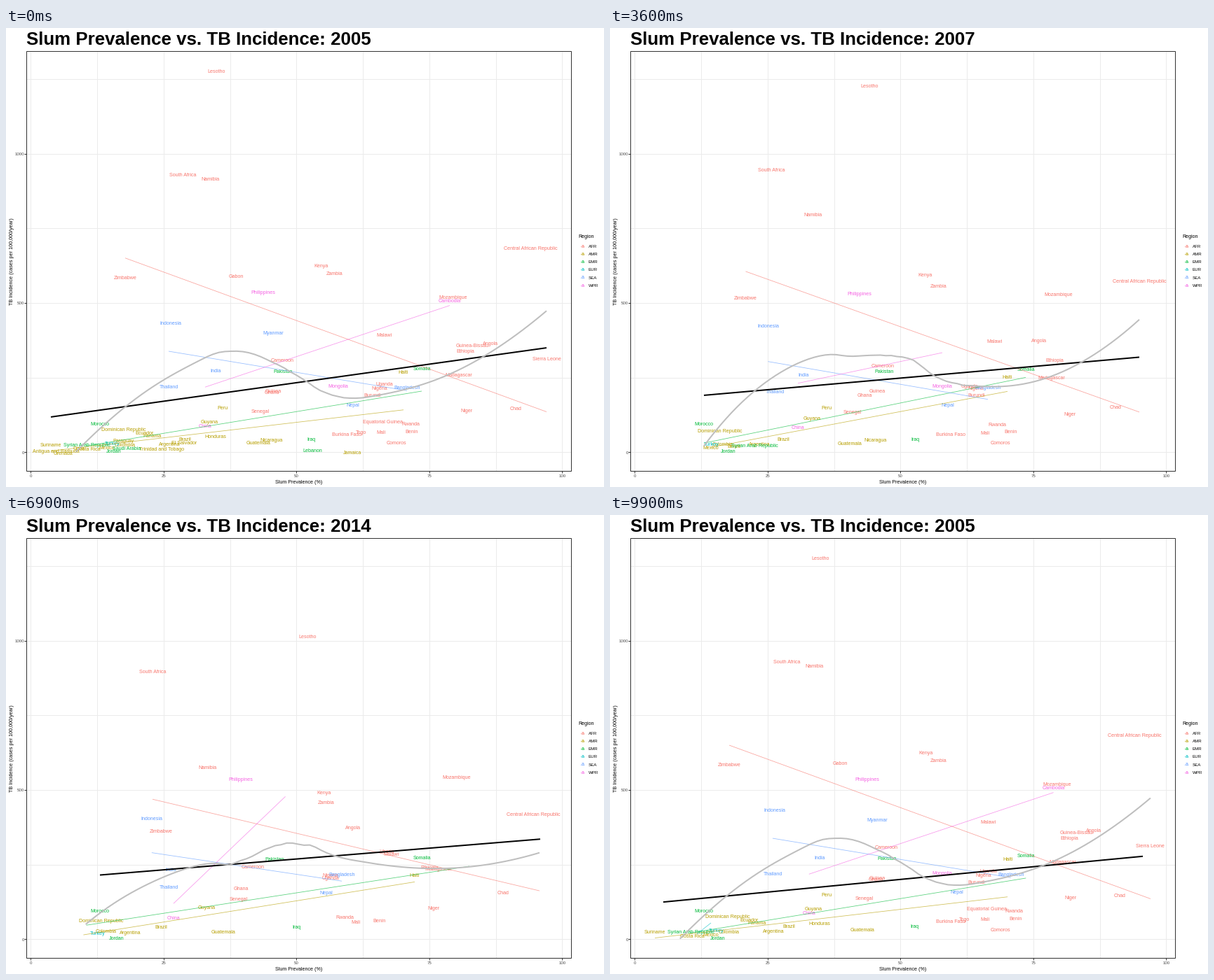
Recreate the animation shown at these times as a matplotlib script. Size 853 by 656 pixels, loop 10000 ms.

```python
import numpy as np
import matplotlib.pyplot as plt
from matplotlib.animation import FuncAnimation
from matplotlib.patches import Rectangle

W, H, DPI = 853, 656, 64
PX = 72 / DPI                     # points per pixel
HOLD, MOVE = 13, 12               # frames at rest and in transition
STEP = HOLD + MOVE
YEARS = (2005, 2007, 2009, 2014)
COLORS = dict(AFR="#F8766D", AMR="#B79F00", EMR="#00BA38",
              EUR="#00BFC4", SEA="#619CFF", WPR="#F564E3")
LEFT, TOP, RIGHT, BOTTOM = 29.5, 32.5, 806, 633

plt.rcParams["font.family"] = "Liberation Sans"
fig = plt.figure(figsize=(W / DPI, H / DPI), dpi=DPI, facecolor="white")
ax = fig.add_axes([0, 0, 1, 1])
ax.set(xlim=(0, W), ylim=(H, 0))
ax.axis("off")


def text(x, y, s, size=7.1, color="black", **kw):
    kw = {"ha": "center", "va": "baseline", **kw}
    return ax.text(x, y, s, fontsize=size * PX, color=color, **kw)


def line(xs, ys, color, width=1.0, **kw):
    return ax.plot(xs, ys, color=color, lw=width * PX,
                   solid_capstyle="butt", **kw)[0]


def x_px(v):
    return 35.3 + 7.58 * v


def y_px(v):
    return 606.3 - 0.4265 * v


def mix(a, b, p):
    return (1 - p) * np.asarray(a) + p * np.asarray(b)


def ease(u):
    return 4 * u ** 3 if u < 0.5 else 1 - 4 * (1 - u) ** 3


# Panel, grid and axes
for v in np.arange(0, 101, 12.5):
    line([x_px(v)] * 2, [TOP, BOTTOM], "#EBEBEB", zorder=0)
for v in range(0, 1251, 250):
    line([LEFT, RIGHT], [y_px(v)] * 2, "#EBEBEB", zorder=0)
ax.add_patch(Rectangle((LEFT, TOP), RIGHT - LEFT, BOTTOM - TOP, fill=False,
                       ec="#333333", lw=PX, zorder=9))
for v in range(0, 101, 25):
    line([x_px(v)] * 2, [BOTTOM, BOTTOM + 3], "#333333")
    text(x_px(v), 642, v, 6.1, "#4D4D4D")
for v in range(0, 1001, 500):
    line([LEFT - 3, LEFT], [y_px(v)] * 2, "#333333")
    text(26.3, y_px(v) + 2.4, v, 6.1, "#4D4D4D", ha="right")
text(417.5, 651, "Slum Prevalence (%)")
text(9.6, 333.5, "TB Incidence (cases per 100,000/year)", 7.2,
     rotation=90, rotation_mode="anchor")
title = text(29, 24, "", 25.9, ha="left", weight="bold")

# Legend
text(816, 300.5, "Region", ha="left")
for i, (name, color) in enumerate(COLORS.items()):
    y = 311.5 + 11.25 * i
    text(822.5, y + 2, "a", 7.1, color)
    line([819.5, 825.5], [y, y], color, 0.8, alpha=0.4)
    text(831, y + 2.2, name, 6.1, ha="left")

ALL, GAP, ENDS = (0, 1, 2, 3), (0, 1, 3), (0, 3)
labels = []


def add(region, name, start, end=None, mid=None, years=ALL):
    """Label a country; `mid` bends its path, 2007 lies halfway to it."""
    end = end or start
    if mid is None:
        mid = mix(start, end, 0.55) if years == ALL else start
    path = [start, mix(start, mid, 0.5), mid, end]
    spots = [path[k] if k in years else None for k in range(len(YEARS))]
    art = text(0, 0, name, 7.1, COLORS[region], zorder=3)
    labels.append((region, art, spots))


add("AFR", "Lesotho", (300, 61), (420, 243), (441, 103))
add("AFR", "South Africa", (252, 209), (209, 251), (209, 195))
add("AFR", "Namibia", (291, 215), (286, 402))
add("AFR", "Zimbabwe", (170, 356), (225, 488), (217, 415))
add("AFR", "Kenya", (450, 339), (459, 426), (449, 366))
add("AFR", "Zambia", (469, 350), (444, 434), (469, 387))
add("AFR", "Central African Republic", (748, 314), (742, 447), (762, 408))
add("AFR", "Mozambique", (638, 384), (644, 372))
add("AFR", "Malawi", (539, 438), (541, 511), (558, 457))
add("AFR", "Angola", (691, 450), (456, 450), (533, 443))
add("AFR", "Ethiopia", (655, 461), (596, 519), (613, 487))
add("AFR", "Madagascar", (646, 495), (621, 507), (613, 503))
add("AFR", "Cameroon", (394, 474), (321, 513), (384, 491))
add("AFR", "Uganda", (540, 508), (441, 521))
add("AFR", "Nigeria", (533, 514), (415, 514), (510, 514))
add("AFR", "Ghana", (379, 520), (323, 537))
add("AFR", "Senegal", (363, 547), (334, 548), (329, 549))
add("AFR", "Niger", (657, 546), (566, 565), (654, 557))
add("AFR", "Chad", (727, 543), (704, 539))
add("AFR", "Rwanda", (577, 565), (438, 580), (528, 568))
add("AFR", "Mali", (535, 577), (462, 583), (535, 580))
add("AFR", "Benin", (579, 576), (501, 581), (564, 577))
add("AFR", "Burundi", (523, 524), (474, 553), years=GAP)
add("AFR", "Guinea", (381, 518), (363, 532), years=GAP)
add("AFR", "Burkina Faso", (486, 580), (533, 584), years=GAP)
add("AFR", "Comoros", (557, 592), (562, 592), years=GAP)
add("AFR", "Gabon", (328, 354), (315, 417), years=ENDS)
add("AFR", "Guinea-Bissau", (665, 453), (659, 449), years=ENDS)
add("AFR", "Sierra Leone", (771, 472), (608, 475), years=ENDS)
add("AFR", "Equatorial Guinea", (538, 562), (537, 538), years=ENDS)
add("AFR", "Togo", (506, 577), (424, 583), years=ENDS)
add("AFR", "Liberia", (553, 484), (533, 476), years=(2, 3))
add("AFR", "South Sudan", (760, 545), years=(3,))
add("AFR", "Mauritania", (641, 560), years=(3,))
add("AFR", "Sao Tome and Principe", (691, 566), years=(3,))

add("AMR", "Colombia", (170, 595), (135, 594))
add("AMR", "Dominican Republic", (168, 573), (126, 581))
add("AMR", "Argentina", (233, 594), (161, 597))
add("AMR", "Brazil", (255, 587), (204, 589), (239, 588))
add("AMR", "Guyana", (290, 562), (286, 569), (286, 552))
add("AMR", "Guatemala", (360, 592), (296, 597))
add("AMR", "Haiti", (567, 491), (599, 522), (567, 506))
add("AMR", "Mexico", (144, 599), (119, 598), years=GAP)
add("AMR", "Peru", (309, 542), (294, 556), years=GAP)
add("AMR", "Suriname", (64, 595), (91, 593), years=ENDS)
add("AMR", "Costa Rica", (117, 601), (76, 602), years=ENDS)
add("AMR", "Ecuador", (198, 578), (308, 584), years=ENDS)
add("AMR", "Panama", (209, 582), (231, 588), years=ENDS)
add("AMR", "Honduras", (299, 583), (243, 590), years=ENDS)
add("AMR", "Nicaragua", (379, 588), years=(0, 1))
add("AMR", "Belize", (177, 597), years=(1,))
add("AMR", "Antigua and Barbuda", (71, 604), years=(0,))
add("AMR", "Grenada", (81, 607), years=(0,))
add("AMR", "Cuba", (104, 600), years=(0,))
add("AMR", "Paraguay", (168, 589), years=(0,))
add("AMR", "El Salvador", (254, 592), years=(0,))
add("AMR", "Trinidad and Tobago", (222, 601), years=(0,))
add("AMR", "Jamaica", (494, 606), years=(0,))

add("EMR", "Morocco", (134, 565))
add("EMR", "Jordan", (154, 604), (133, 605), (183, 604))
add("EMR", "Pakistan", (395, 490), (380, 492))
add("EMR", "Somalia", (593, 486), (593, 490))
add("EMR", "Iraq", (435, 587), (393, 589), (435, 587))
add("EMR", "Syrian Arab Republic", (115, 595), (182, 597), (297, 597), GAP)
add("EMR", "Saudi Arabia", (172, 600), years=(0,))
add("EMR", "Lebanon", (437, 603), years=(0,))
add("EMR", "Afghanistan", (510, 526), years=(3,))
add("EMR", "Djibouti", (533, 478), years=(3,))
add("EMR", "Sudan", (729, 567), years=(3,))
add("EMR", "Tunisia", (95, 592), years=(3,))

add("EUR", "Turkey", (152, 593), (124, 599))
add("EUR", "Armenia", (144, 583), years=(3,))

add("SEA", "Indonesia", (235, 421), (200, 437))
add("SEA", "India", (299, 489), (217, 512))
add("SEA", "Thailand", (232, 512), (225, 535), (239, 527))
add("SEA", "Bangladesh", (572, 513), (452, 514))
add("SEA", "Nepal", (495, 538), (446, 540))
add("SEA", "Myanmar", (381, 435), (346, 450), years=ENDS)

add("WPR", "Philippines", (367, 377), (325, 374), (345, 381))
add("WPR", "China", (284, 568), (226, 578))
add("WPR", "Mongolia", (474, 511), (359, 525), years=GAP)
add("WPR", "Cambodia", (633, 389), (452, 441), years=ENDS)


def points(k, region=None):
    """Coordinates of the labels shown in year k."""
    pts = [s[k] for r, _, s in labels
           if s[k] is not None and region in (None, r)]
    return np.array(pts, float).T


def trend(pts):
    """Least-squares line across the range of the points."""
    if pts.size < 4:
        return None
    x, y = pts
    ends = np.array([x.min(), x.max()])
    return np.array([ends, np.polyval(np.polyfit(x, y, 1), ends)])


def loess(pts, span=0.75, n=80):
    """Local quadratic smoother, cut off below zero incidence."""
    x, y = pts
    q = np.linspace(x.min(), x.max(), n)
    fit = []
    for v in q:
        d = np.abs(x - v)
        reach = np.sort(d)[int(span * len(x)) - 1]
        w = np.clip(1 - (d / reach) ** 3, 0, None) ** 1.5
        fit.append(np.polyfit((x - v) / reach, y, 2, w=w)[-1])
    fit = np.array(fit)
    keep = fit <= y_px(0)
    even = np.linspace(q[keep][0], q[keep][-1], n)
    return np.array([even, np.interp(even, q[keep], fit[keep])])


TRENDS = {r: [trend(points(k, r)) for k in ALL] for r in COLORS}
OVERALL = [trend(points(k)) for k in ALL]
CURVES = [loess(points(k)) for k in ALL]

trends = {r: line([], [], c, 0.8, alpha=0.65, zorder=4)
          for r, c in COLORS.items()}
overall = line([], [], "black", 2, zorder=5)
curve = line([], [], "#BEBEBE", 2, zorder=6)


def draw(frame):
    k, step = divmod(frame, STEP)
    nxt = (k + 1) % len(YEARS)
    u = max(0, step - HOLD) / MOVE
    p = ease(u)
    year = YEARS[nxt if u >= 0.5 else k]
    title.set_text(f"Slum Prevalence vs. TB Incidence: {year}")

    # Only labels present in both years travel
    for _, art, spots in labels:
        a, b = spots[k], spots[nxt]
        shown = a is not None and (u == 0 or b is not None)
        art.set_visible(shown)
        if shown:
            x, y = mix(a, b, p) if u else a
            art.set_position((x, y + 2.6))

    for region, art in trends.items():
        a, b = TRENDS[region][k], TRENDS[region][nxt]
        art.set_visible(a is not None)
        if a is not None:
            art.set_data(*(a if b is None else mix(a, b, p)))
    curve.set_data(*mix(CURVES[k], CURVES[nxt], p))
    overall.set_data(*OVERALL[k])     # switches only with the year
    return []


anim = FuncAnimation(fig, draw, frames=STEP * len(YEARS), interval=100,
                     init_func=lambda: [], repeat=True, repeat_delay=0)
plt.show()
```
